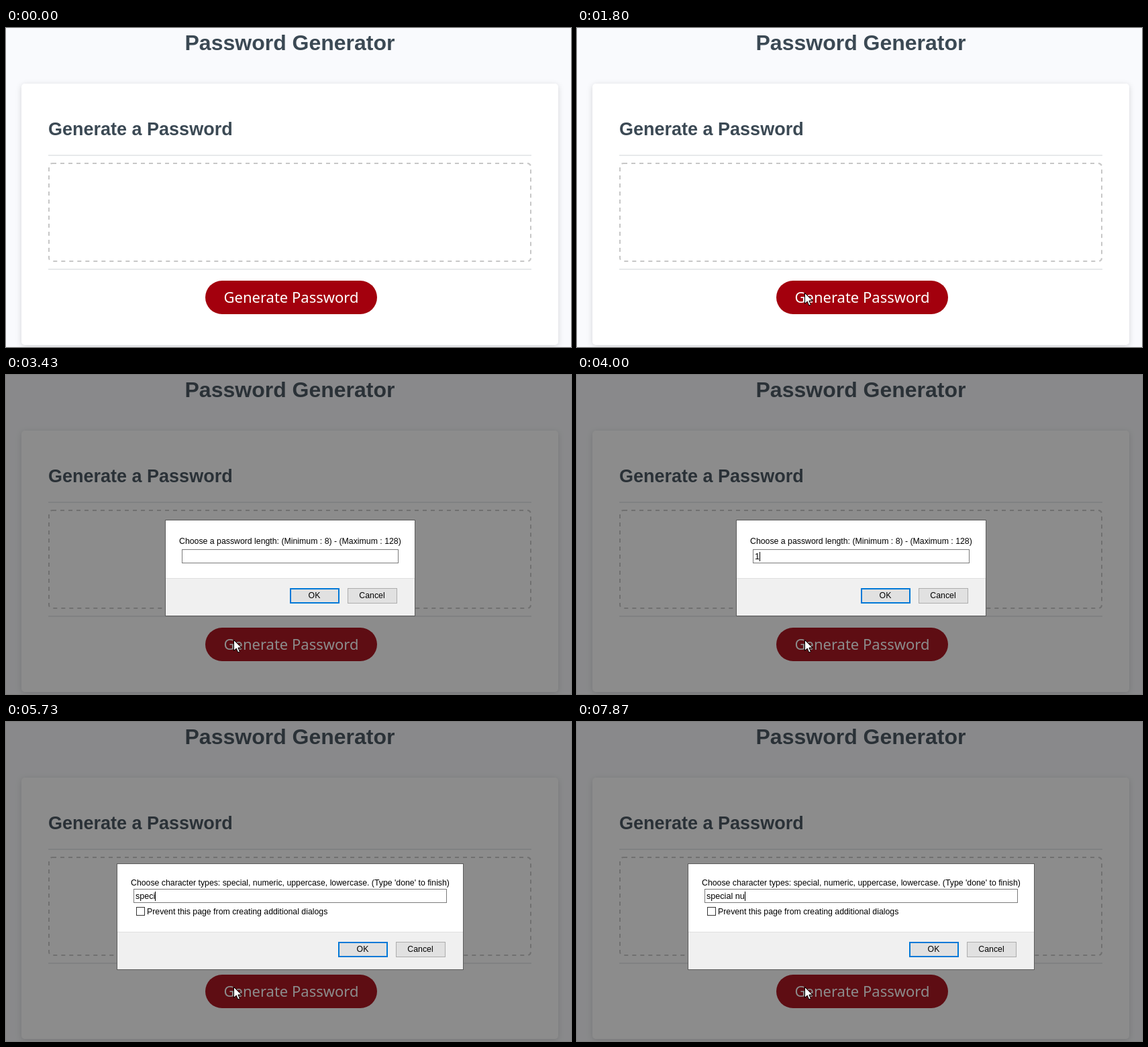
Recreate the animation shown at these times as an HTML page. Size 842x476 px, loop 8 s.

```html
<!DOCTYPE html>
<html lang="en">
<head>
<meta charset="utf-8">
<title>Password Generator</title>
<style>
  html, body { margin: 0; width: 100%; height: 100%; overflow: hidden; background: #f9fafd; }
  svg { display: block; width: 842px; height: 476px; }
  text { font-family: "Liberation Sans", Arial, sans-serif; white-space: pre; }
  .heading { font-weight: bold; fill: #3b4954; }
  .card { fill: #fff; filter: drop-shadow(0 2px 4px rgba(0, 0, 0, .15)); }
  .rule { fill: #e7e9eb; }
  .result { fill: none; stroke: #c7c7c7; stroke-width: 2; stroke-dasharray: 6 6; }
  .generate { font: 22px "Noto Sans", "Open Sans", sans-serif; fill: #fff; text-anchor: middle; }
  .shade { fill: rgba(26, 26, 26, .5); }
  .dialog text { font-size: 12.3px; fill: #000; }
  .dialog .label { text-anchor: middle; }
  .dialog .typed { font-size: 12.6px; }
</style>
</head>
<body>
<svg viewBox="0 0 842 476">
  <rect width="842" height="476" fill="#f9fafd"/>
  <text class="heading" x="266.5" y="33" font-size="32">Password Generator</text>
  <rect class="card" x="23" y="83" width="800" height="390" rx="5"/>
  <text class="heading" x="63" y="160" font-size="27">Generate a Password</text>
  <rect class="rule" x="63" y="189" width="720" height="2"/>
  <rect class="result" x="64" y="202" width="718" height="146" rx="5"/>
  <rect class="rule" x="63" y="359" width="720" height="2"/>
  <rect x="297" y="377" width="256" height="50" rx="25" fill="#a3000d"/>
  <text class="generate" x="425" y="410">Generate Password</text>
  <g id="modal">
    <rect class="shade" width="842" height="476"/>
  </g>
  <path id="pointer" d="M.5 .5V16.5L4.2 13L6.8 19L9.4 17.9L6.9 12H12Z" fill="#fff" stroke="#000"/>
</svg>
<script>
const LOOP = 8000;
const OPEN = 1830;
const NEXT = 4500;
const svgNs = "http://www.w3.org/2000/svg";
const modal = document.getElementById("modal");
const pointer = document.getElementById("pointer");

function add(parent, tag, attrs, content = "") {
  const node = document.createElementNS(svgNs, tag);
  for (const key in attrs) node.setAttribute(key, attrs[key]);
  node.textContent = content;
  parent.append(node);
  return node;
}

// Box with its border drawn inside the given bounds.
function box(parent, x, y, width, height, fill, stroke, line = 1) {
  return add(parent, "rect", {
    x: x + line / 2, y: y + line / 2, width: width - line, height: height - line,
    fill, stroke, "stroke-width": line
  });
}

function button(parent, x, y, label, border, line) {
  box(parent, x, y, 74, 23, "#e1e1e1", border, line);
  add(parent, "text", { class: "label", x: x + 36.5, y: y + 15 }, label);
}

function makeDialog({ x, y, width, height, footer, message, messageY, fieldY, option, keys }) {
  const group = add(modal, "g", { class: "dialog" });
  const fieldX = x + 24, right = x + width;
  box(group, x - 1, y - 1, width + 2, height + 2, "#fff", "#5c5c5c");
  add(group, "rect", { x, y: footer, width, height: y + height - footer, fill: "#f0f0f0" });
  add(group, "rect", { x, y: footer, width, height: 1, fill: "#dfdfdf" });
  add(group, "text", { x: x + 20, y: messageY }, message);
  box(group, fieldX, fieldY, width - 48, 21, "#fff", "#7a7a7a");
  if (option) {
    box(group, x + 28, y + 64, 13, 13, "#fff", "#333");
    add(group, "text", { x: x + 44, y: y + 75 }, option);
  }
  button(group, right - 186, footer + 15, "OK", "#0078d7", 2);
  button(group, right - 100, footer + 15, "Cancel", "#adadad", 1);
  const typed = add(group, "text", { class: "typed", x: fieldX + 3, y: fieldY + 15 });
  const caret = add(group, "rect", { y: fieldY + 4, width: 1, height: 14, fill: "#000" });

  return (t, visible, caretOn) => {
    group.style.display = visible ? "" : "none";
    if (!visible) return;
    typed.textContent = keys.filter(([time]) => t >= time).map(([, key]) => key).join("");
    const end = typed.textContent ? typed.getComputedTextLength() : 0;
    caret.setAttribute("x", Math.round(fieldX + 3 + end));
    caret.style.display = caretOn ? "" : "none";
  };
}

const showLength = makeDialog({
  x: 238, y: 217, width: 371, height: 142, footer: 303,
  message: "Choose a password length: (Minimum : 8) - (Maximum : 128)",
  messageY: 252, fieldY: 260,
  keys: [[3930, "1"], [4030, "0"]]
});
const showTypes = makeDialog({
  x: 166, y: 212, width: 515, height: 157, footer: 313,
  message: "Choose character types: special, numeric, uppercase, lowercase. (Type 'done' to finish)",
  messageY: 244, fieldY: 249,
  option: "Prevent this page from creating additional dialogs",
  keys: [[5070, "s"], [5200, "p"], [5300, "e"], [5570, "c"], [5730, "i"], [6000, "a"],
         [6070, "l"], [7730, " "], [7800, "n"], [7870, "u"]]
});

const caretGaps = [[2370, 2870], [3430, 3930], [6600, 7130], [7670, 7730]];

function movePointer(t) {
  const p = Math.min(1, Math.max(0, (t - 1130) / 400));
  const eased = 1 - (1 - p) ** 2;
  const x = 225 + 114 * eased;
  const y = 476 - 81 * eased;
  pointer.style.display = t < 1130 ? "none" : "";
  pointer.setAttribute("transform", `translate(${Math.round(x)} ${Math.round(y)})`);
}

function draw(t) {
  const caretOn = !caretGaps.some(([from, to]) => t >= from && t < to);
  modal.style.display = t >= OPEN ? "" : "none";
  showLength(t, t >= OPEN && t < NEXT, caretOn);
  showTypes(t, t >= NEXT, caretOn);
  movePointer(t);
}

const start = performance.now();
function tick() {
  draw((performance.now() - start) % LOOP);
  requestAnimationFrame(tick);
}
tick();
</script>
</body>
</html>
```
